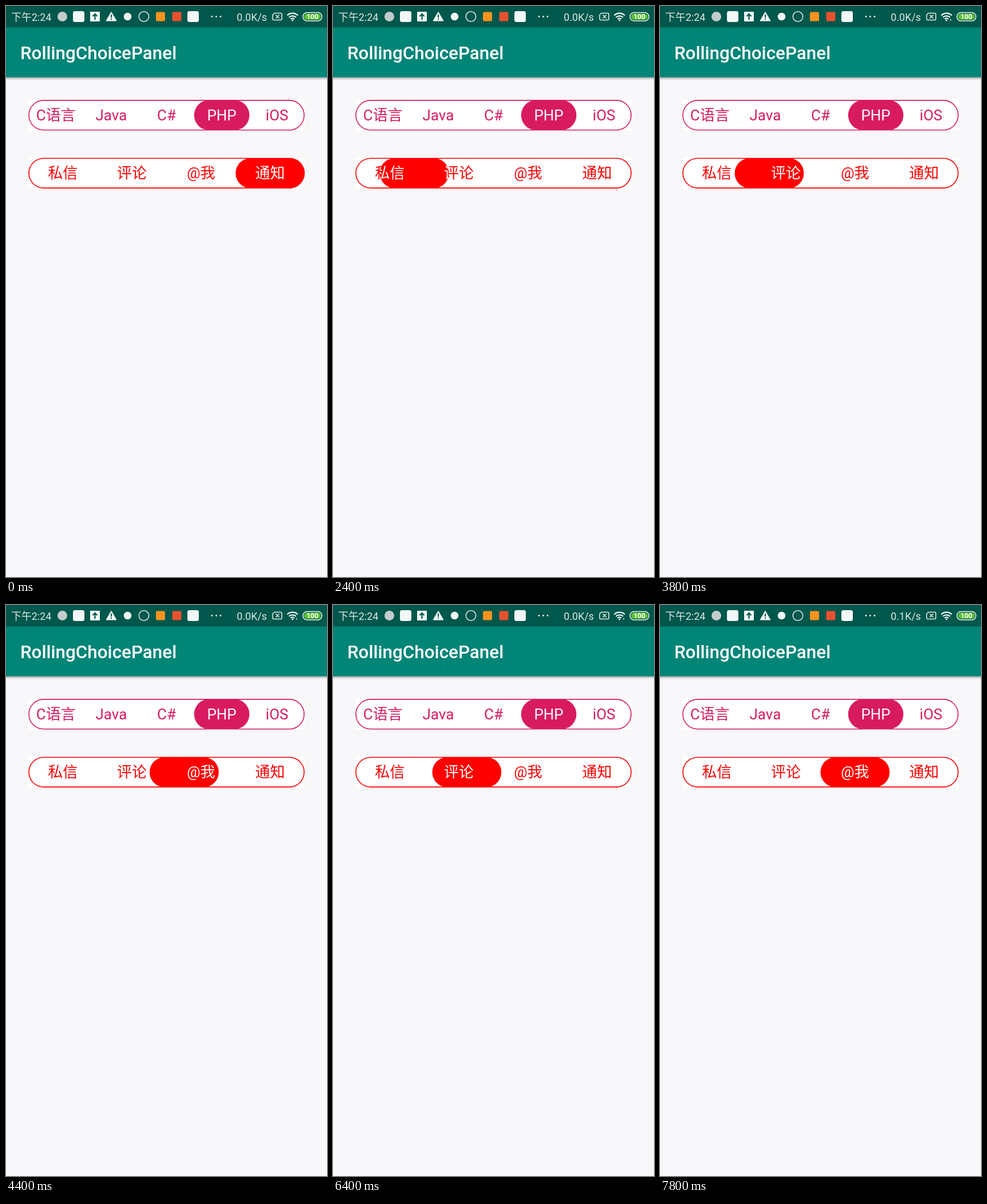
Animation, 561 px wide and 998 px high, one loop 8000 ms. Source, as an HTML page:

```html
<!DOCTYPE html>
<html lang="zh">
<head>
<meta charset="utf-8">
<style>
html, body { margin: 0; width: 100%; height: 100%; overflow: hidden; background: #f8f7f9; }
svg { display: block; width: 100%; height: 100%; }
text { font-family: Roboto, "Noto Sans CJK SC", "Noto Sans CJK", sans-serif; }
.status text { font-size: 17.9px; fill: #dceae8; }
.status .level { font: bold 12px Roboto, sans-serif; fill: #fff; }
.title { font-size: 31.4px; font-weight: 500; fill: #fff; }
.menu text { font-size: 26px; text-anchor: middle; }
.line { fill: none; stroke: #dceae8; stroke-width: 1.6; }
.wifi { stroke: #f2f8f7; stroke-width: 2.2; }
</style>
</head>
<body>
<svg viewBox="0 0 561 998">
  <defs>
    <linearGradient id="shade" x2="0" y2="1">
      <stop stop-color="#555" stop-opacity=".6"/>
      <stop offset=".4" stop-color="#777" stop-opacity=".28"/>
      <stop offset="1" stop-color="#999" stop-opacity="0"/>
    </linearGradient>
  </defs>
  <rect width="561" height="998" fill="#f8f7f9"/>
  <rect y="124.500" width="561" height="6" fill="url(#shade)"/>
  <rect y="37" width="561" height="87.600" fill="#008577"/>
  <rect width="561" height="37.500" fill="#00574b"/>

  <g class="status" fill="#f2f8f7">
    <text x="9" y="26">下午2:24</text>
    <circle cx="98.5" cy="18.5" r="8.5" fill="#c3cccb"/>
    <rect x="117" y="9" width="20" height="19" rx="3.5"/>
    <rect x="147" y="10" width="17" height="17" rx="1"/>
    <path d="M155.5 24V14M151.5 18l4-4 4 4" fill="none" stroke="#00574b" stroke-width="2.2"/>
    <path d="M184 10.5l9 15.5h-18z" stroke="#f2f8f7" stroke-linejoin="round"/>
    <path d="M184 15v5.500m0 1.500v2" stroke="#00574b" stroke-width="2"/>
    <circle cx="212.5" cy="18.5" r="6.8"/>
    <circle cx="241" cy="18.5" r="8.700" class="line"/>
    <rect x="262" y="10.5" width="16" height="16" rx="2.5" fill="#f7931e"/>
    <rect x="290.5" y="10.5" width="16" height="16" rx="2" fill="#e8512f"/>
    <rect x="317" y="9" width="20" height="19" rx="3.5"/>
    <circle cx="360" cy="18.5" r="1.4"/>
    <circle cx="367.5" cy="18.5" r="1.4"/>
    <circle cx="375" cy="18.5" r="1.4"/>
    <text id="speed" x="456" y="26" text-anchor="end"></text>
    <path class="line" d="M469 12.5h11q2 0 2 2v8q0 2-2 2h-12q-2 0-2-2v-7zM471.5 15.5l6 6m0-6l-6 6"/>
    <path class="line wifi" d="M491.5 16.500a13 13 0 0 1 18.500 0M494.500 19.800a9 9 0 0 1 12.500 0M497.500 22.800a5 5 0 0 1 6.500 0"/>
    <circle cx="500.700" cy="25" r="1.5"/>
    <path id="traffic" d="M506.500 23.500h3l-1.500 2.500z"/>
    <rect x="519" y="11.5" width="33" height="14.5" rx="7" fill="none" stroke="#f2f8f7" stroke-width="1.5"/>
    <rect x="521" y="13.500" width="29" height="10.500" rx="5" fill="#57c22d"/>
    <text class="level" x="535.500" y="23" text-anchor="middle">100</text>
  </g>

  <text class="title" x="25" y="93">RollingChoicePanel</text>
  <g id="menus"></g>
</svg>
<script>
const LEFT = 39, WIDTH = 483, HEIGHT = 54.5, LOOP = 8000, STEP = 200;
const menus = document.getElementById("menus");
const speed = document.getElementById("speed");
const traffic = document.getElementById("traffic");

// Builds a menu and returns a function that places its sliding pill.
function addMenu(id, top, color, labels) {
  const cell = WIDTH / labels.length;
  const texts = labels.map((label, i) =>
    `<text x="${LEFT + cell * (i + 0.5)}" y="${top + 36.2}">${label}</text>`).join("");
  const pill = `<rect class="pill" y="${top + 1}" width="${cell}" height="${HEIGHT - 2}" rx="26"/>`;
  menus.insertAdjacentHTML("beforeend", `
    <g class="menu" id="${id}" fill="${color}">
      <clipPath id="${id}-clip">${pill}</clipPath>
      <rect x="${LEFT}" y="${top}" width="${WIDTH}" height="${HEIGHT}" fill="#fff"/>
      <rect x="${LEFT + 1}" y="${top + 1.3}" width="${WIDTH - 2}" height="${HEIGHT - 2.6}" rx="25.8"
        fill="none" stroke="${color}" stroke-width="1.6"/>
      ${texts}${pill}
      <g clip-path="url(#${id}-clip)" fill="#fff">${texts}</g>
    </g>`);
  const pills = document.querySelectorAll(`#${id} .pill`);
  return x => pills.forEach(p => p.setAttribute("x", x));
}

const placeLanguage = addMenu("languages", 163.6, "#d81b60", ["C语言", "Java", "C#", "PHP", "iOS"]);
const placeMessage = addMenu("messages", 264.9, "#ff0000", ["私信", "评论", "@我", "通知"]);
placeLanguage(LEFT + WIDTH * 3 / 5);

// Drag path of the lower pill: time in ms, left edge in px.
const drag = [[0, 401.3], [1000, 401.3], [1400, 355], [2700, 39], [3300, 39],
  [4400, 251], [5200, 123], [6400, 173.5], [7400, 280.5], [LOOP, 280.5]];

function dragX(t) {
  const i = drag.findIndex(([time]) => time > t);
  const [t0, x0] = drag[i - 1], [t1, x1] = drag[i];
  const u = (t - t0) / (t1 - t0);
  return x0 + (x1 - x0) * u * u * (3 - 2 * u);
}

const start = performance.now();
function draw() {
  const elapsed = Math.max(0, performance.now() - start);
  const t = Math.floor(elapsed % LOOP / STEP) * STEP;
  placeMessage(dragX(t));
  speed.textContent = t < 7200 ? "0.0K/s" : "0.1K/s";
  traffic.style.display = t >= 3800 && t < 7200 ? "" : "none";
  requestAnimationFrame(draw);
}
draw();
</script>
</body>
</html>
```
